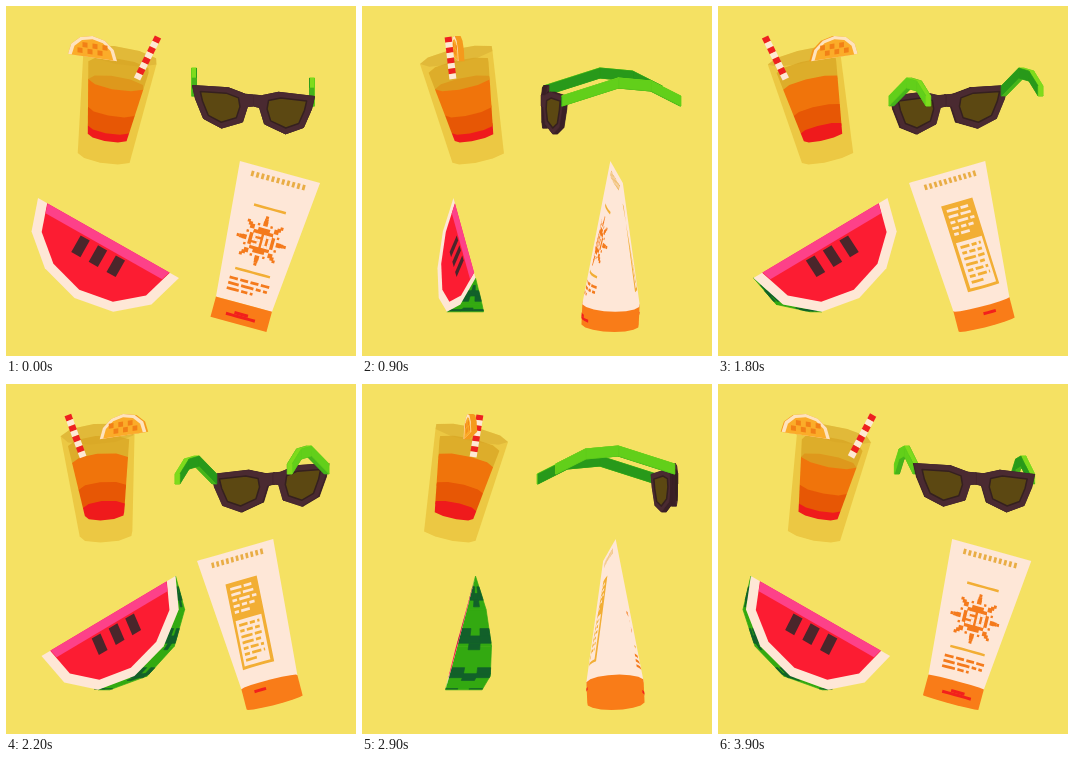
An HTML page with a canvas for the animation above (4000 ms loop, 350 px wide and 350 px high).

```html
<!DOCTYPE html>
<html>
<head>
<meta charset="utf-8">
<title>Summer things</title>
<style>
html, body { margin: 0; width: 100%; height: 100%; overflow: hidden; background: #f5e163; }
canvas { display: block; width: 350px; height: 350px; }
</style>
</head>
<body>
<canvas id="stage" width="350" height="350"></canvas>
<script>
const ctx = document.getElementById('stage').getContext('2d');
const LOOP = 4000, STEP = 100;
const { PI, sin, cos } = Math;
let C = 1, S = 0;

// Spin a point about the vertical axis at screen x = cx.
const spin = (cx, [x, y, z]) => [cx + x * C - z * S, y, x * S + z * C];
const depth = (x, z) => x * S + z * C;
const mix = (a, b, t) => a.map((v, i) => v + (b[i] - v) * t);
const times = (n, f) => Array.from({ length: n }, (_, i) => f(i));
const random = n => { const v = sin(n * 12.9898) * 43758.5453; return v - Math.floor(v); };

function area(p) {
  return p.reduce((sum, a, i) => {
    const b = p[(i + 1) % p.length];
    return sum + a[0] * b[1] - b[0] * a[1];
  }, 0);
}

function trace(p) {
  p.forEach((q, i) => i ? ctx.lineTo(q[0], q[1]) : ctx.moveTo(q[0], q[1]));
  ctx.closePath();
}

function fill(p, color, seam) {
  ctx.beginPath();
  trace(p);
  ctx.fillStyle = color;
  ctx.fill();
  if (seam) {
    ctx.strokeStyle = color;
    ctx.lineWidth = 0.7;
    ctx.lineJoin = 'round';
    ctx.stroke();
  }
}

function hull(pts) {
  const p = pts.slice().sort((a, b) => a[0] - b[0] || a[1] - b[1]);
  const half = list => {
    const h = [];
    for (const q of list) {
      while (h.length > 1) {
        const a = h[h.length - 2], b = h[h.length - 1];
        if ((b[0] - a[0]) * (q[1] - a[1]) - (b[1] - a[1]) * (q[0] - a[0]) > 0) break;
        h.pop();
      }
      h.push(q);
    }
    return h.slice(0, -1);
  };
  return half(p).concat(half(p.reverse()));
}

// ---------- watermelon ----------
// p runs along the straight edge, q away from it; the wedge widens with q.
const ARC = times(7, k => {
  const a = k * PI / 6;
  return [-81 * cos(a), 69 * sin(a) - 2.5 * sin(2 * a)];
});
const melonPoint = ([p, q], side) =>
  spin(102.5, [0.87 * p - 0.493 * q, 232 + 0.493 * p + 0.87 * q, side * 0.3 * q]);
const box = (p0, p1, q0, q1) => [[p0, q0], [p1, q0], [p1, q1], [p0, q1]];

function rindPoint(t, s) {
  const i = Math.min(5, Math.floor(t));
  return melonPoint(mix(ARC[i], ARC[i + 1], t - i), s);
}

function rindCell(t0, t1, s0, s1, color) {
  const q = [rindPoint(t0, s1), rindPoint(t1, s1), rindPoint(t1, s0), rindPoint(t0, s0)];
  if (area(q) > 0) fill(q, color, true);
}

function drawMelon() {
  for (let i = 0; i < 6; i++) rindCell(i, i + 1, -1, 1, '#33a911');
  for (let k = 0; k < 5; k++)
    for (let j = 0; j < 3; j++) {
      const t = 0.62 + 1.2 * k + (j % 2 ? 0.1 : -0.1), s = -1 + j * 2 / 3;
      rindCell(t - 0.2, t, s, s + 2 / 3, '#12602a');
      rindCell(t, t + 0.2, s, s + 2 / 3, '#12602a');
    }
  for (const side of [-1, 1]) {
    const on = p => p.map(q => melonPoint(q, side));
    const face = on(ARC.slice().reverse());
    if (area(face) * side <= 0) continue;
    fill(face, '#fee7d6');
    fill(on(ARC.map(([p, q]) => [p * 0.87, q * 0.86])), '#fc1c32');
    fill(on([[-70, 0], [70, 0], [67, 9.5], [-67, 9.5]]), '#fd4189');
    for (const p of [-25.5, -5.5, 15]) fill(on(box(p, p + 10.5, 11.5, 30.5)), '#4a262b');
  }
}

// ---------- drink ----------
const BASE = [-3.6, 151, -15.6], RIM = [13, 50, 9];
const outer = u => 27 + 11 * u, inner = u => 17 + 16 * u;

function ring(u, radius) {
  const ax = RIM.map((v, i) => v - BASE[i]);
  const len = Math.hypot(...ax), flat = Math.hypot(ax[0], ax[1]);
  const n = ax.map(v => v / len);
  const e = [-ax[1] / flat, ax[0] / flat, 0];
  const f = [n[1] * e[2] - n[2] * e[1], n[2] * e[0] - n[0] * e[2], n[0] * e[1] - n[1] * e[0]];
  const c = mix(BASE, RIM, u), r = radius(u);
  return times(9, k => {
    const a = k * PI * 2 / 9 + 0.3;
    return spin(102, c.map((v, i) => v + r * (cos(a) * e[i] + sin(a) * f[i])));
  });
}

const band = (u0, u1, radius, color) => fill(hull(ring(u0, radius).concat(ring(u1, radius))), color);

function drawGlass() {
  const toward = depth(RIM[0] - BASE[0], RIM[2] - BASE[2]) > 0;
  band(0, 1, outer, '#ecc843');
  fill(ring(1, outer), 'rgba(208,164,44,.4)');
  const layers = [
    () => band(0.2, 0.28, inner, '#ef1a1c'),
    () => band(0.28, 0.46, inner, '#e75705'),
    () => band(0.46, 0.73, inner, '#f0740b'),
    () => band(0.73, 0.9, inner, 'rgba(216,164,34,.75)')
  ];
  if (!toward) layers.reverse();
  layers.forEach(draw => draw());
}

function drawStraw() {
  const a = spin(102, [50, 31, 24]), b = spin(101, [30, 73, 15]);
  ctx.lineWidth = 7;
  for (let i = 0; i < 8; i++) {
    const p = mix(a, b, i / 8), q = mix(a, b, (i + 1) / 8);
    ctx.beginPath();
    ctx.moveTo(p[0], p[1]);
    ctx.lineTo(q[0], q[1]);
    ctx.strokeStyle = i % 2 ? '#fee8d4' : '#ee2020';
    ctx.stroke();
  }
}

function drawSlice() {
  const at = (p, z) => p.map(([x, y]) => spin(102, [x - 15.5, 51.5 + y + 0.15 * x, z]));
  const disc = r => times(7, k => [-24.5 * r * cos(k * PI / 6), -21.5 * r * sin(k * PI / 6)]);
  fill(hull(at(disc(1), 1).concat(at(disc(1), 7))), '#f59a1c');
  const z = C > 0 ? 7 : 1;
  fill(at(disc(1), z), '#fee3bd');
  fill(at(disc(0.85), z), '#fbac29');
  for (let i = 0; i < 6; i++) {
    const x = -15 + i * 5, y = i % 2 ? -14 : -8;
    fill(at(box(x, x + 5, y, y + 5), z), '#f28016');
  }
}

function drawDrink() {
  drawGlass();
  const parts = [drawStraw, drawSlice];
  if (depth(40, 18) > depth(-15, 4)) parts.reverse();
  parts.forEach(draw => draw());
}

// ---------- sunglasses ----------
// One half of the frame, mirrored for the other; the first and last points meet at the bridge.
const HALF = [[0, 89], [8, 89], [25, 84], [61, 85], [58, 98], [50, 117], [32, 125], [11, 117], [6, 101], [0, 100]];
const LENS = HALF.slice(1, -1).map(p => mix([33, 104], p, 0.72));
const WRAP = 0.2;

function drawHalf(side) {
  const at = (p, z) => p.map(([x, y]) =>
    spin(247.5, [side * x, y + 0.09 * side * x, z + WRAP * (60 - x)]));
  const front = at(HALF, 57), back = at(HALF, 52);
  const facing = C + WRAP * side * S > 0;
  fill(facing ? back : front, '#3a2026');
  front.forEach((p, i) => {
    const j = (i + 1) % front.length;
    fill([p, front[j], back[j], back[i]], '#3a2026', true);
  });
  fill(facing ? front : back, '#4a2a31', true);
  fill(at(LENS, facing ? 57 : 52), '#5c4812');
  ctx.strokeStyle = '#35201f';
  ctx.lineWidth = 1.5;
  ctx.stroke();
}

function drawFrame() {
  (S > 0 ? [-1, 1] : [1, -1]).forEach(drawHalf);
}

function drawTemple(side) {
  const path = [[57, 0], [0, -18], [-33, -15], [-63, 0]];
  const tones = ['#7edb1c', '#28991a', '#46b41a', '#62cf1a'];
  const rows = path.map(([z, y]) => [[2.5, 0], [-2.5, 0], [-2.5, 10], [2.5, 10]]
    .map(([dx, dy]) => spin(247, [side * (59 + dx), 85 + 5 * side + y + dy, z])));
  const quads = [];
  const add = (q, tone) => quads.push({ q, tone, z: q.reduce((s, p) => s + p[2], 0) });
  for (let i = 0; i < 3; i++)
    for (let k = 0; k < 4; k++) {
      const m = (k + 1) % 4;
      add([rows[i][k], rows[i][m], rows[i + 1][m], rows[i + 1][k]], tones[k]);
    }
  add(rows[3], tones[0]);
  quads.sort((a, b) => a.z - b.z).forEach(f => fill(f.q, f.tone, true));
}

function drawShades() {
  [
    [depth(0, 57), drawFrame],
    [depth(-59, -5), () => drawTemple(-1)],
    [depth(59, -5), () => drawTemple(1)]
  ].sort((a, b) => a[0] - b[0]).forEach(part => part[1]());
}

// ---------- sunscreen ----------
const CREAM = '#fee7d7', GOLD = '#f2ae34', ORANGE = '#f47a1c', RED = '#f2201c';
const NECK = 137;
const halfWidth = d => 41.5 - 12.5 * Math.min(1, d / NECK);

// a runs across the tube, d down its length.
function tubePoint(a, d, side) {
  const s = a / halfWidth(d);
  const z = side * 29 * Math.min(1, d / NECK) * Math.sqrt(Math.max(0, 1 - s * s));
  return spin(251, [23 - d * 0.263 + a * 0.965, 166 + d * 0.965 + a * 0.263, z]);
}

const tubeRing = d => times(16, i => {
  const t = i * PI / 8;
  return tubePoint(halfWidth(d) * cos(t), d, sin(t) < 0 ? -1 : 1);
});

function patch(a0, a1, d0, d1, color, side = 1) {
  const n = Math.max(1, Math.ceil((a1 - a0) / 6));
  ctx.beginPath();
  for (let i = 0; i < n; i++) {
    const l = a0 + (a1 - a0) * i / n, r = a0 + (a1 - a0) * (i + 1) / n;
    const q = box(l, r, d0, d1).map(p => tubePoint(side * p[0], p[1], side));
    if (area(q) > 0) trace(q);
  }
  ctx.fillStyle = color;
  ctx.fill();
}

// Rows of dashes that stand for lines of print.
function print(rows, a0, a1, d, gap, color, side) {
  for (let i = 0; i < rows; i++) {
    const end = i === rows - 1 ? a0 + (a1 - a0) * 0.65 : a1;
    for (let a = a0, k = 1; a < end - 1; k++) {
      const stop = Math.min(end, a + 4 + 9 * random(d + i * 7 + k));
      patch(a, stop, d + i * gap, d + i * gap + 2.8, color, side);
      a = stop + 2.5;
    }
  }
}

function drawSun(d) {
  const dot = (r, t, w) =>
    patch(r * cos(t) - w, r * cos(t) + w, d + r * sin(t) - w, d + r * sin(t) + w, ORANGE);
  for (const w of [6, 10, 13]) patch(-w, w, d - 19 + w, d + 19 - w, ORANGE);
  patch(-10, 10, d - 10, d + 10, ORANGE);
  for (let k = 0; k < 8; k++) {
    const t = k * PI / 4;
    for (let i = 0; i < 3; i++) dot(17.5 + i * 3.2, t, 2.3 - i * 0.4);
    dot(17, t + PI / 8, 1.2);
  }
  ['1110111', '1000101', '1110101', '0010101', '1110111'].forEach((row, y) => {
    [...row].forEach((bit, x) => {
      if (+bit) patch(-9.5 + x * 2.7, -6.6 + x * 2.7, d - 6.5 + y * 2.6, d - 3.7 + y * 2.6, CREAM);
    });
  });
}

function drawTube() {
  const body = () => fill(hull(tubeRing(0).concat(tubeRing(NECK))), CREAM);
  const cap = () => fill(hull(tubeRing(NECK).concat(tubeRing(158))), '#f97c18');
  const order = S > 0 ? [cap, body] : [body, cap];
  order.forEach(draw => draw());

  for (const side of [1, -1])
    for (let i = 0; i < 11; i++)
      patch(-27.5 + i * 5.3, -24.7 + i * 5.3, 6, 11.5, '#e9ad45', side);

  patch(-16.5, 16.5, 37, 39.5, GOLD);
  drawSun(71.5);
  patch(-18, 18, 103, 105.5, GOLD);
  print(3, -21, 20, 113, 5.5, ORANGE, 1);
  patch(-7, 7, 146, 149, RED);
  patch(-15, 15, 149, 152, RED);

  patch(-17, 17, 31, 120, GOLD, -1);
  print(5, -13, 13, 36, 6, CREAM, -1);
  patch(-14, 14, 70, 117, CREAM, -1);
  print(7, -11, 11, 74, 6, GOLD, -1);
  patch(-9, 4, 143, 146, RED, -1);
}

function render() {
  const angle = Math.floor(performance.now() % LOOP / STEP) * STEP / LOOP * PI * 2;
  C = cos(angle);
  S = sin(angle);
  ctx.fillStyle = '#f5e163';
  ctx.fillRect(0, 0, 350, 350);
  drawDrink();
  drawShades();
  drawMelon();
  drawTube();
  requestAnimationFrame(render);
}
render();
</script>
</body>
</html>
```
